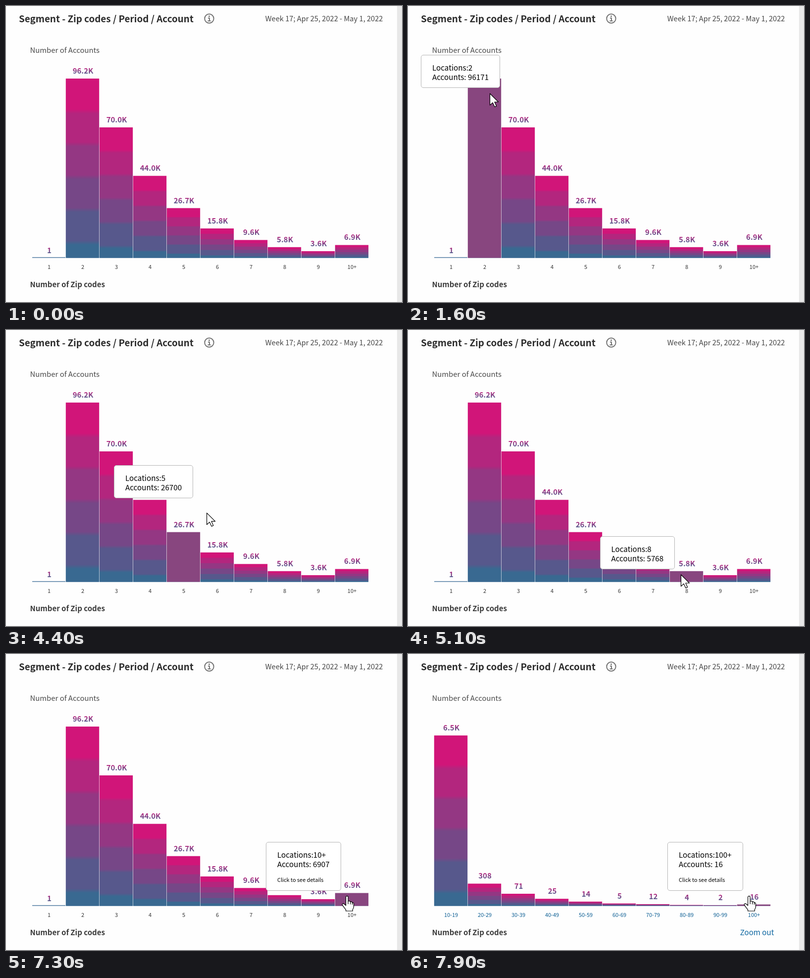
Animation of 800 by 600 pixels, one loop 8 s. Source, as an HTML page:

```html
<!DOCTYPE html>
<html lang="en">
<head>
<meta charset="utf-8">
<title>Segment histogram</title>
<style>
html, body { margin: 0; width: 100%; height: 100%; overflow: hidden; background: #fefefe; }
body, text { font-family: "Noto Sans CJK SC", "Noto Sans CJK JP", "Open Sans", sans-serif; }
svg { position: absolute; left: 0; top: 0; }
.bold { font-weight: 600; }
.value { font-size: 15px; font-weight: 600; text-anchor: middle; fill: url(#fade); }
.tick { font-size: 11px; text-anchor: middle; }
#tip {
  position: absolute; box-sizing: border-box; padding: 15px 22px 12px;
  border: 1px solid #b5b5b5; border-radius: 5px; background: #fff;
  font-size: 15.2px; line-height: 19px; color: #000; white-space: nowrap;
}
#more { margin-top: 13px; font-size: 10.9px; }
</style>
</head>
<body>
<svg width="800" height="600">
  <defs><linearGradient id="fade" x1="0" y1="0" x2="0" y2="1"></linearGradient></defs>
  <rect x="790" width="10" height="600" fill="#e8e8e8"/>
  <text class="bold" x="26" y="33" font-size="18.85" fill="#2c2c2c">Segment - Zip codes / Period / Account</text>
  <g fill="none" stroke="#747474" stroke-width="2">
    <circle cx="410.5" cy="25.5" r="9.2"/>
    <path d="M408 24.5H411V30M407.5 30.2H413.5"/>
    <circle cx="410.5" cy="20.7" r="1.5" fill="#747474" stroke="none"/>
  </g>
  <text x="761.5" y="31" font-size="14.65" fill="#464646" text-anchor="end">Week 17; Apr 25, 2022 - May 1, 2022</text>
  <text x="48.5" y="95" font-size="14.9" fill="#4b4b4b">Number of Accounts</text>
  <g id="chart"></g>
  <text class="bold" x="48.5" y="570" font-size="15" fill="#3a3a3a">Number of Zip codes</text>
  <text id="zoomOut" x="739.5" y="570" font-size="15.2" fill="#0d66a0" text-anchor="end">Zoom out</text>
</svg>
<div id="tip"><div id="place"></div><div id="count"></div><div id="more">Click to see details</div></div>
<svg width="800" height="600">
  <g id="cursor" fill="#fff" stroke="#000" stroke-width="1.2" stroke-linejoin="round">
    <path id="arrow" d="M0 0V23.5L5.6 18.4 9.6 27 13.2 25.4 9.4 17H17Z"/>
    <g id="hand">
      <path d="M-2.4 2a2.3 2.3 0 0 1 4.6 0V10q3.8-1 4.4 1.4q3.4-.8 3.9 1.5q3-.2 3 2.6v5.5q0 3-2.2 6v3H-2.4v-2.6q-3.4-4-7.4-10q0-3.2 3.4-2.2l4 3.6Z"/>
      <path fill="none" d="M2.2 10v6M6.6 11.4v5M10.5 13v4"/>
    </g>
  </g>
</svg>
<script>
const LOOP = 8000, STEP = 100, ENTER = 1100, ZOOM_START = 7535, ZOOM_TIME = 500;
const LEFT = 53, PITCH = 68, BASE = 510.6, BANDS = 6, LAST = 9;
const $ = id => document.getElementById(id);
const clamp = k => Math.min(1, Math.max(0, k));
const mix = (a, b, k) => a + (b - a) * k;
const show = (el, on) => { el.style.visibility = on ? "visible" : "hidden"; };

function add(parent, tag, attrs) {
  const el = document.createElementNS("http://www.w3.org/2000/svg", tag);
  for (const key in attrs) el.setAttribute(key, attrs[key]);
  return parent.appendChild(el);
}

// Pink to blue in even bands with slightly soft edges.
for (let i = 0; i < BANDS; i++) {
  const k = i / (BANDS - 1);
  const color = `rgb(${mix(209, 57, k)}, ${mix(21, 105, k)}, ${mix(121, 145, k)})`;
  for (const offset of [i * .183 + .012, (i + 1) * .183 - .012])
    add($("fade"), "stop", { offset: clamp(offset), "stop-color": color });
}

const overview = {
  counts: [1, 96171, 69995, 44000, 26700, 15800, 9600, 5768, 3600, 6907],
  name: i => i < LAST ? `${i + 1}` : "10+",
  peak: 363.5
};
const detail = {
  counts: [6450, 308, 71, 25, 14, 5, 12, 4, 2, 16],
  name: i => i < LAST ? `${i + 1}0-${i + 1}9` : "100+",
  peak: 375
};
const barHeight = ({ counts, peak }, i) => counts[i] / Math.max(...counts) * peak;
const short = n => n < 1000 ? `${n}` : `${(Math.round(n / 100) / 10).toFixed(1)}K`;

const columns = overview.counts.map((_, i) => {
  const x = LEFT + PITCH * i, mid = x + PITCH / 2;
  add($("chart"), "rect", { x, y: BASE - 1.5, width: PITCH - 1, height: 1.5, fill: "#5580a5" });
  return {
    bar: add($("chart"), "rect", { x: x - .2, width: PITCH - .6 }),
    value: add($("chart"), "text", { x: mid + .5, class: "value" }),
    tick: add($("chart"), "text", { x: mid, y: 533, class: "tick" })
  };
});

// Pointer moves with rests between them.
const moves = [
  { start: 1000, end: 1540, x: 165.5, y: 177.5 },
  { start: 3700, end: 3800, x: 274, y: 214 },
  { start: 3800, end: 4600, x: 430, y: 400 },
  { start: 4800, end: 5035, x: 551.5, y: 496 },
  { start: 5750, end: 6235, x: 684, y: 488 },
  { start: 6300, end: 6500, x: 690, y: 487 },
  { start: 7200, end: 7235, x: 689, y: 491 }
];
const smooth = k => k * k * (3 - 2 * k);

function pointerAt(t) {
  let x = 250, y = -40;
  for (const move of moves) {
    const k = smooth(clamp((t - move.start) / (move.end - move.start)));
    x = mix(x, move.x, k);
    y = mix(y, move.y, k);
  }
  return [x, y];
}

const easeCubic = k => k < .5 ? 4 * k ** 3 : 1 - 4 * (1 - k) ** 3;
const columnAt = (x, y) => y > 110 && x >= LEFT ? Math.floor((x - LEFT) / PITCH) : -1;

function drawTip(data, i, x, y, clickable) {
  const tip = $("tip");
  show(tip, i >= 0);
  if (i < 0) return;
  $("place").textContent = `Locations:${data.name(i)}`;
  $("count").textContent = `Accounts: ${data.counts[i]}`;
  $("more").style.display = clickable ? "block" : "none";
  tip.style.left = Math.max(26, x - 12 - tip.offsetWidth) + "px";
  tip.style.top = y - 11 - tip.offsetHeight + "px";
}

function draw(t) {
  const zoomed = t >= ZOOM_START, data = zoomed ? detail : overview;
  const progress = easeCubic(clamp((t - ZOOM_START) / ZOOM_TIME));
  const [x, y] = pointerAt(t);
  // The hover state trails the pointer a little.
  const [hoverX, hoverY] = pointerAt(t - 65);
  const hover = t < ENTER ? -1 : columnAt(hoverX, hoverY);

  columns.forEach(({ bar, value, tick }, i) => {
    const height = mix(barHeight(overview, i), barHeight(detail, i), progress);
    bar.setAttribute("y", BASE - height);
    bar.setAttribute("height", height);
    bar.setAttribute("fill", i === hover ? "#88467f" : "url(#fade)");
    value.setAttribute("y", BASE - height - 10);
    value.textContent = short(data.counts[i]);
    tick.textContent = data.name(i);
    tick.setAttribute("fill", zoomed ? "#0d5f94" : "#333");
  });
  show($("zoomOut"), zoomed);
  drawTip(data, hover, hoverX, hoverY, zoomed || hover === LAST);

  const onLink = columnAt(x, y) === LAST;
  $("cursor").setAttribute("transform", `translate(${x} ${y})`);
  show($("arrow"), t >= ENTER && !onLink);
  show($("hand"), t >= ENTER && onLink);
}

function play() {
  const t = performance.now() % LOOP;
  draw(Math.floor(t / STEP) * STEP);
  requestAnimationFrame(play);
}
play();
</script>
</body>
</html>
```
